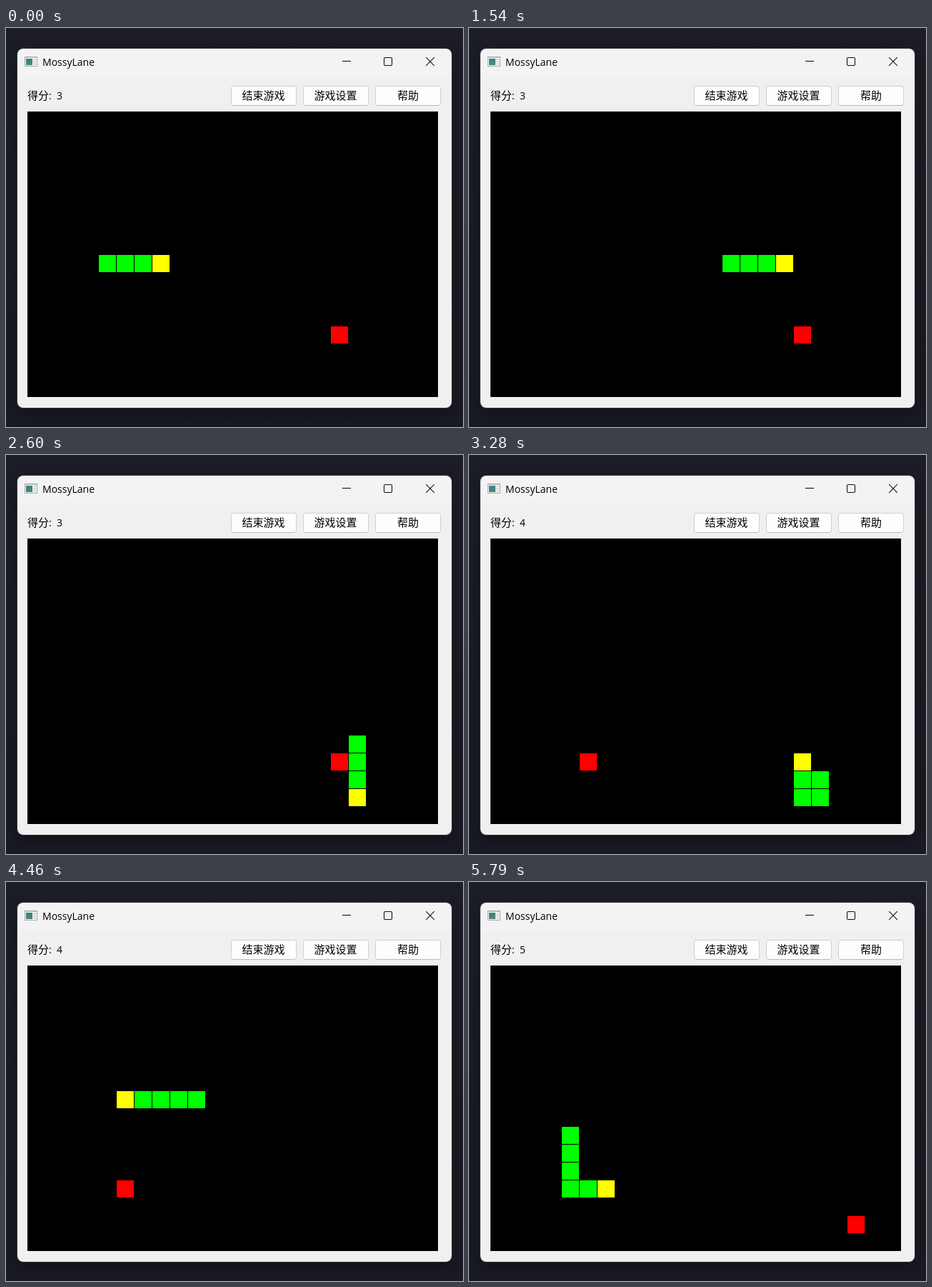
An HTML page for the animation above (5.92 s loop, 640 by 559 pixels).

```html
<!DOCTYPE html>
<html lang="zh-CN">
<head>
<meta charset="utf-8">
<title>MossyLane</title>
<style>
  html, body { margin: 0; width: 100%; height: 100%; overflow: hidden; background: #1b1b25; }
  svg { display: block; width: 640px; height: 559px; }
  text { font: 15px "Noto Sans CJK SC", "Noto Sans CJK", sans-serif; fill: #000; }
  .latin { font: 14px "Open Sans", "Noto Sans", sans-serif; }
  .mid { text-anchor: middle; }
  .glyph { fill: none; stroke: #111; stroke-width: 1.1; }
  .cells { shape-rendering: crispEdges; }
</style>
</head>
<body>
<svg viewBox="0 0 640 559">
  <defs>
    <linearGradient id="desk" x1="0" y1="0" x2="0" y2="1">
      <stop offset="0" stop-color="#1d1d28"/>
      <stop offset="1" stop-color="#1a1a25"/>
    </linearGradient>
    <linearGradient id="bar" x1="0" y1="0" x2="0" y2="1">
      <stop offset="0" stop-color="#f3f3f3"/>
      <stop offset=".07" stop-color="#f3f3f3"/>
      <stop offset=".09" stop-color="#f0f0f0"/>
      <stop offset="1" stop-color="#f0f0f0"/>
    </linearGradient>
    <linearGradient id="pane" x1="0" y1="0" x2="0" y2="1">
      <stop offset="0" stop-color="#3f7d8c"/>
      <stop offset="1" stop-color="#4d8a6c"/>
    </linearGradient>
    <filter id="blur" x="-10%" y="-10%" width="120%" height="120%">
      <feGaussianBlur stdDeviation="11"/>
    </filter>
    <g id="button">
      <rect width="92" height="28" rx="4" fill="#d0d0d0"/>
      <path d="M3 27.5H89" stroke="#bababa"/>
      <rect x="1" y="1" width="90" height="26" rx="3" fill="#fdfdfd"/>
    </g>
  </defs>

  <rect width="640" height="559" fill="url(#desk)"/>
  <rect x="16" y="36" width="608" height="503" rx="8" opacity=".4" filter="url(#blur)"/>
  <rect x="15.5" y="28.5" width="609" height="504" rx="8.5" fill="none" stroke="#3a3a42"/>
  <rect x="16" y="29" width="608" height="503" rx="8" fill="url(#bar)"/>

  <rect x="26.5" y="40.5" width="17" height="13" fill="#f4f6f6" stroke="#a4a9aa"/>
  <path d="M27 41.5H43" stroke="#c2c8ca"/>
  <rect x="28" y="43" width="9" height="9" fill="url(#pane)"/>
  <path d="M38 44.5H42M38 47.5H42M38 50.5H42" stroke="#b7bdbf"/>
  <text class="latin" x="51" y="53">MossyLane</text>

  <g class="glyph">
    <path d="M471 46.5H483"/>
    <rect x="529.5" y="41.5" width="11" height="11" rx="1.5"/>
    <path d="M588.2 41.2L599.8 52.8M599.8 41.2L588.2 52.8"/>
  </g>

  <text x="30" y="100">得分</text>
  <text class="latin" x="60" y="100">:</text>
  <text class="latin" id="score" x="71" y="100">3</text>

  <use href="#button" x="315" y="81"/>
  <use href="#button" x="416" y="81"/>
  <use href="#button" x="517" y="81"/>
  <text class="mid" x="360.5" y="100">结束游戏</text>
  <text class="mid" x="461.5" y="100">游戏设置</text>
  <text class="mid" x="563" y="100">帮助</text>

  <g class="cells">
    <rect x="30" y="117" width="575" height="400"/>
    <path id="food" fill="#f00"/>
    <path id="body" fill="#0f0"/>
    <path id="head" fill="#ff0"/>
  </g>
</svg>
<script>
  const LOOP = 5920;
  const $ = id => document.getElementById(id);
  const score = $('score'), food = $('food'), body = $('body'), head = $('head');

  // Cells visited by the head, tail of the starting snake first.
  const DIRS = { R: [1, 0], L: [-1, 0], U: [0, -1], D: [0, 1] };
  const track = [[4, 8]];
  for (const leg of 'R14 D6 L1 U7 L13 D5 R2'.split(' ')) {
    const [dx, dy] = DIRS[leg[0]];
    for (let n = +leg.slice(1); n > 0; n--) {
      const [x, y] = track[track.length - 1];
      track.push([x + dx, y + dy]);
    }
  }

  // Move times: [start, interval, count]
  const times = [
    [270, 270, 2], [740, 200, 1], [940, 67.5, 5], [1540, 220, 2],
    [2010, 68, 6], [2600, 220, 2], [2950, 330, 2], [3350, 70, 5],
    [3760, 70, 7], [4250, 0, 2], [4320, 70, 3], [4790, 0, 1],
    [4920, 67.5, 5], [5520, 270, 2]
  ].flatMap(([start, gap, n]) => Array.from({ length: n }, (_, i) => start + i * gap));

  const foods = [[17, 12], [5, 12], [20, 14]];
  const meals = [20, 44];

  const cell = ([x, y]) => `M${30 + x * 25} ${118 + y * 25}h24v24h-24z`;
  let shown = -1;

  function draw(t) {
    const moves = times.filter(m => m <= t).length;
    if (moves === shown) return;
    shown = moves;
    const eaten = meals.filter(m => m <= moves).length;
    const at = moves + 3;
    score.textContent = 3 + eaten;
    food.setAttribute('d', cell(foods[eaten]));
    body.setAttribute('d', track.slice(at - 3 - eaten, at).map(cell).join(''));
    head.setAttribute('d', cell(track[at]));
  }

  const begin = performance.now();
  function tick() {
    draw((performance.now() - begin) % LOOP);
    requestAnimationFrame(tick);
  }
  tick();
</script>
</body>
</html>
```
